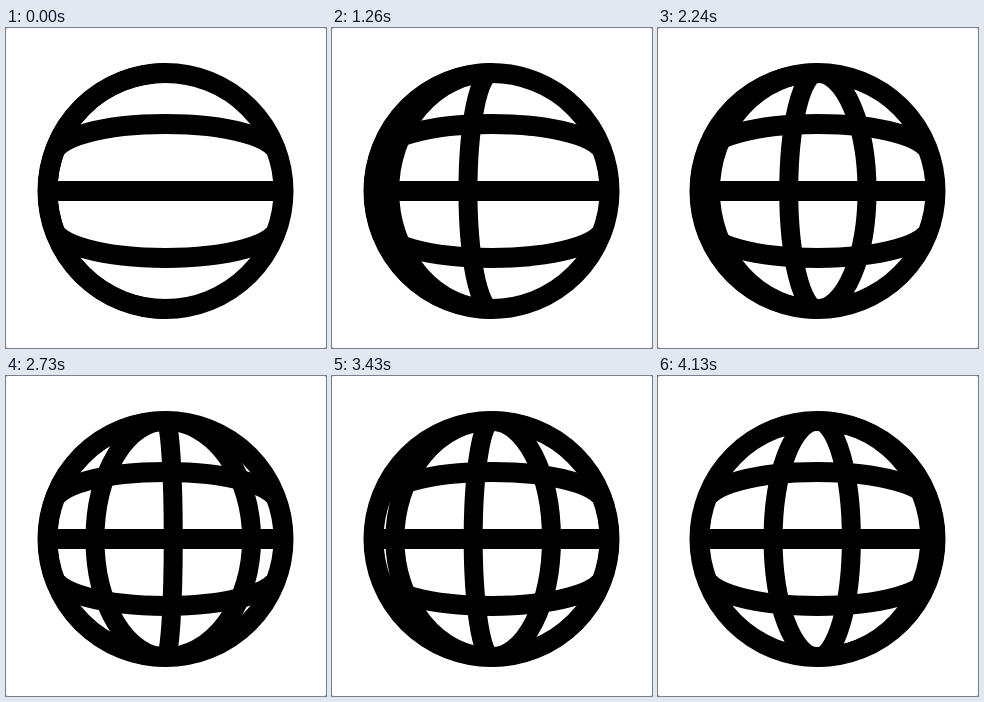
Write an HTML page that moves like this. It is 320 px wide and 320 px high and loops after 4.2 s.

```html
<!DOCTYPE html>
<html lang="en">
<head>
<meta charset="utf-8">
<title>Spinning globe</title>
<style>
  html, body { margin: 0; width: 100%; height: 100%; overflow: hidden; background: #fff; }
  svg { display: block; width: 100vw; height: 100vh; }
</style>
</head>
<body>
<svg viewBox="0 0 320 320">
  <rect width="320" height="320" fill="#999"/>
  <rect width="320" height="320" rx="2" fill="#fff"/>
  <g id="globe" fill="none" stroke="#000" stroke-width="20">
    <circle cx="159.5" cy="163" r="118"/>
    <path d="M42 163H277"/>
    <path d="M48.5 126A111 30 0 0 1 270.5 126"/>
    <path d="M48.5 200A111 30 0 0 0 270.5 200"/>
  </g>
</svg>
<script>
const STEP = 70, STEPS = 60, SPACING = 15, SPEED = 5.22;
const CX = 159.5, CY = 163, R = 118;
const globe = document.getElementById('globe');

const meridians = Array.from({ length: 4 }, () => {
  const path = document.createElementNS('http://www.w3.org/2000/svg', 'path');
  path.setAttribute('stroke-width', 19);
  globe.append(path);
  return path;
});

// Half ellipse from pole to pole, bulging by a signed offset at the equator.
function meridianPath(offset) {
  const sweep = offset > 0 ? 1 : 0;
  return `M${CX} ${CY - R}A${Math.abs(offset)} ${R} 0 0 ${sweep} ${CX} ${CY + R}`;
}

function draw(time) {
  const step = Math.floor(time / STEP) % STEPS;
  meridians.forEach((path, i) => {
    const offset = (step - i * SPACING) * SPEED - R + 0.5;
    path.setAttribute('d', meridianPath(Math.max(-R, Math.min(R, offset))));
  });
}

let start;
function tick(now) {
  start ??= now;
  draw(now - start);
  requestAnimationFrame(tick);
}
draw(0);
requestAnimationFrame(tick);
</script>
</body>
</html>
```
